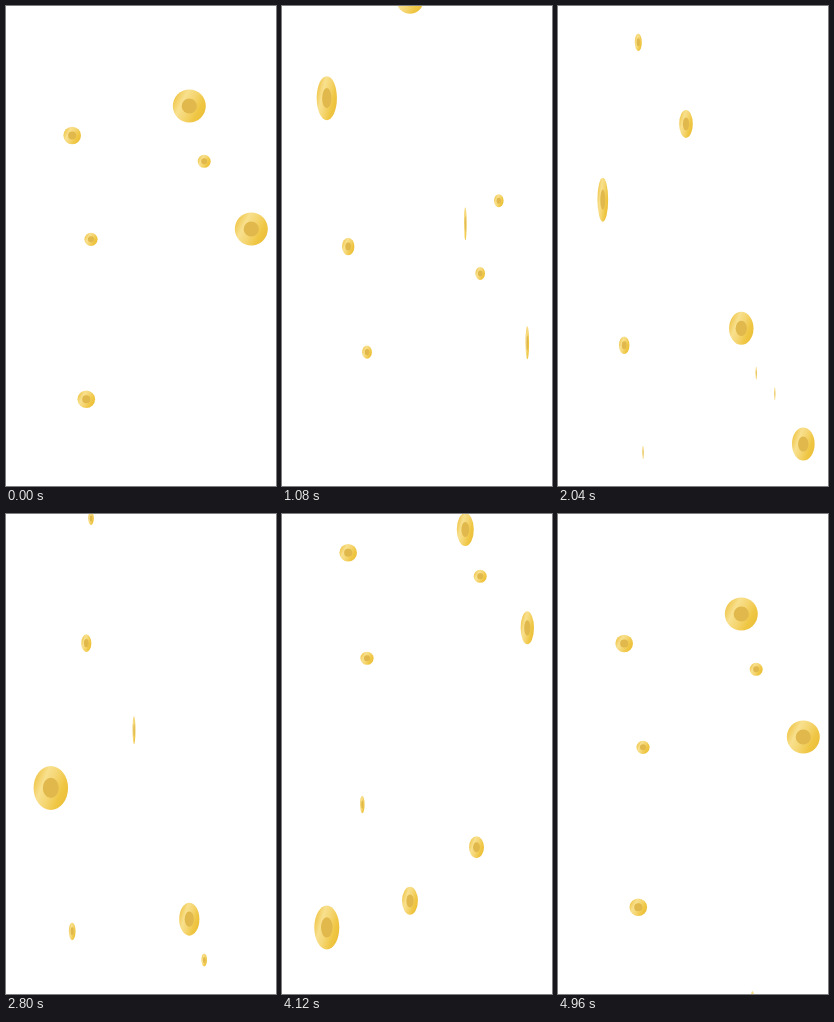
An HTML page for the animation above (5 s loop, 270 by 480 pixels).

```html
<!DOCTYPE html>
<html lang="en">
<head>
<meta charset="utf-8">
<title>Falling coins</title>
<style>
html, body { margin: 0; width: 100%; height: 100%; overflow: hidden; background: #fff; }
svg { display: block; width: 100%; height: 100%; }
</style>
</head>
<body>
<svg id="stage" viewBox="0 0 270 480" xmlns="http://www.w3.org/2000/svg">
  <defs>
    <linearGradient id="gold" x1="0" y1="0.25" x2="1" y2="0.75">
      <stop offset="0" stop-color="#efc342"/>
      <stop offset="0.28" stop-color="#f8e08e"/>
      <stop offset="0.5" stop-color="#f5d673"/>
      <stop offset="0.78" stop-color="#efc643"/>
      <stop offset="1" stop-color="#ebbd36"/>
    </linearGradient>
  </defs>
</svg>
<script>
const NS = 'http://www.w3.org/2000/svg';
const LOOP = 5000, STEP = 40, END = LOOP - STEP, FLOOR = 480;
const stage = document.getElementById('stage');
const coins = [];

function circle(parent, r, fill) {
  const el = document.createElementNS(NS, 'circle');
  el.setAttribute('r', r);
  el.setAttribute('fill', fill);
  parent.appendChild(el);
}

function addCoin(x, r, fall, spin) {
  const el = document.createElementNS(NS, 'g');
  circle(el, 1, 'url(#gold)');
  circle(el, .46, '#e0b84c');
  stage.appendChild(el);
  coins.push({ x, r, fall, spin, el });
}

// Leaves through the floor, then comes back from above to y; speeds in px/ms.
function around(y, speed, backSpeed = speed) {
  return (t, r) => {
    const down = y + speed * t;
    return down < FLOOR + r ? down : y - backSpeed * (END - t);
  };
}

// Falls through the stage a single time.
function once(start, speed) {
  return (t, r) => speed * (t - start) - r;
}

// Swings linearly between face (1) and edge (0), one quarter turn per step.
function turning(start, quarter) {
  return t => {
    const u = Math.max(0, t - start) / quarter % 2;
    return Math.abs(1 - u);
  };
}

// The same swing, but it rests at the last full face within the loop.
function resting(start, quarter) {
  const turns = Math.floor((END - start) / quarter / 2);
  const last = start + turns * 2 * quarter;
  const swing = turning(start, quarter);
  return t => t < last ? swing(t) : 1;
}

addCoin(183.3, 16.5, around(100, .109, .1006), resting(0, 1172));
addCoin(245.3, 16.5, around(223, .1054, .13), resting(0, 1210));
addCoin(66.2, 8.8, around(129.5, .1028, .108), resting(860, 740));
addCoin(198.2, 6.5, around(155.3, .1038, .1107), resting(690, 1480));
addCoin(85, 6.6, around(233.3, .1045, .106), resting(690, 1480));
addCoin(80.3, 8.8, around(393.3, .1223), resting(0, 784));
addCoin(128, 14, once(1020, .1293), turning(1020, 1980));
addCoin(44.8, 22, once(0, .1057), turning(0, 740));
addCoin(216.8, 6.5, once(80, .2012), turning(690, 1480));
addCoin(194.5, 11, once(2250, .1841), turning(1800, 1000));

function draw(ms) {
  const t = Math.min(END, Math.floor((ms % LOOP) / STEP) * STEP);
  for (const { x, r, fall, spin, el } of coins) {
    const y = fall(t, r), w = r * spin(t);
    const shown = w > .02 && y > -r && y < FLOOR + r;
    el.setAttribute('display', shown ? 'inline' : 'none');
    el.setAttribute('transform', `translate(${x} ${y.toFixed(2)}) scale(${w.toFixed(3)} ${r})`);
  }
}

let start = null;
function tick(now) {
  if (start === null) start = now;
  draw(now - start);
  requestAnimationFrame(tick);
}
draw(0);
requestAnimationFrame(tick);
</script>
</body>
</html>
```
